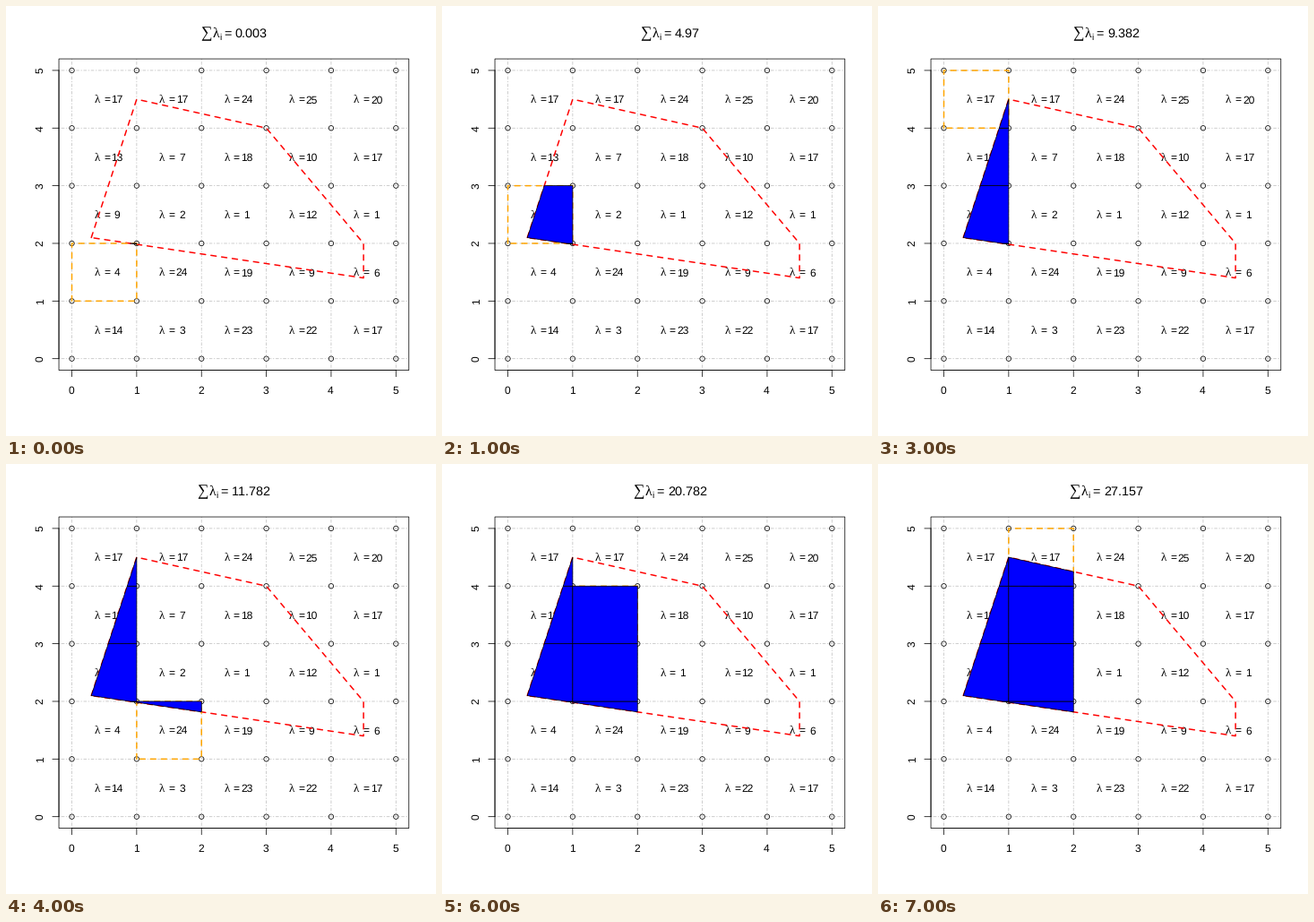
A matplotlib script that plays this animation: 480 by 480 pixels, repeating every 8000 ms.

```python
import matplotlib.pyplot as plt
from matplotlib.animation import FuncAnimation
from matplotlib.patches import Circle, Polygon, Rectangle

SIZE, DPI = 480, 72
SANS, SERIF = "Liberation Sans", "Liberation Serif"
LEFT, RIGHT, TOP, BOTTOM = 59.04, 449.76, 59.04, 406.56
THIN, THICK = 0.75, 1.5
DASH = (0, (4, 4))
DOT_DASH = (0, (1, 3, 4, 3))

# Cell rates, one row per y interval from the bottom up
RATES = [
    [14, 3, 23, 22, 17],
    [4, 24, 19, 9, 6],
    [9, 2, 1, 12, 1],
    [13, 7, 18, 10, 17],
    [17, 17, 24, 25, 20],
]
REGION = [(0.3, 2.1), (1, 4.5), (3, 4), (4.5, 2), (4.5, 1.4)]
CELLS = [(i, j) for i in (0, 1) for j in (1, 2, 3, 4)]

# Unsnapped lines keep sub-pixel positions; a factor of 6 turns kerning off
plt.rcParams.update({"text.hinting": "none", "text.kerning_factor": 6,
                     "path.snap": False})
fig = plt.figure(figsize=(SIZE / DPI, SIZE / DPI), dpi=DPI, facecolor="white")
ax = fig.add_axes([0, 0, 1, 1])
ax.set_xlim(0, SIZE)
ax.set_ylim(SIZE, 0)
ax.axis("off")


def px(x):
    return LEFT + (x + 0.2) * (RIGHT - LEFT) / 5.4


def py(y):
    return BOTTOM - (y + 0.2) * (BOTTOM - TOP) / 5.4


def to_px(points):
    return [(px(x), py(y)) for x, y in points]


def line(xs, ys, color="black", style="-", z=2):
    ax.plot(xs, ys, color=color, lw=THIN, ls=style, zorder=z,
            dash_capstyle="round", solid_capstyle="round")


def label(x, y, s, size=12, font=SANS, ha="left", **kw):
    return ax.text(x, y, s, fontsize=size, family=font, ha=ha,
                   va="baseline", zorder=3, **kw)


def outline(points, color, z):
    return ax.add_patch(Polygon(to_px(points), fill=False, ec=color, lw=THICK,
                                ls=DASH, capstyle="round", joinstyle="round",
                                zorder=z))


def square(i, j):
    return [(i, j), (i, j + 1), (i + 1, j + 1), (i + 1, j)]


def clip_half(points, axis, limit, sign):
    """Keep the part of a polygon where sign * (coordinate - limit) >= 0."""
    out = []
    for a, b in zip(points, points[1:] + points[:1]):
        da, db = sign * (a[axis] - limit), sign * (b[axis] - limit)
        if da >= 0:
            out.append(a)
        if da * db < 0:
            t = da / (da - db)
            out.append((a[0] + t * (b[0] - a[0]), a[1] + t * (b[1] - a[1])))
    return out


def clip_to_cell(points, i, j):
    for axis, low in ((0, i), (1, j)):
        points = clip_half(points, axis, low, 1)
        points = clip_half(points, axis, low + 1, -1)
    return points


def area(points):
    pairs = zip(points, points[1:] + points[:1])
    return abs(sum(a[0] * b[1] - b[0] * a[1] for a, b in pairs)) / 2


# Frame, axes, grid and lattice points
ax.add_patch(Rectangle((LEFT, TOP), RIGHT - LEFT, BOTTOM - TOP, fill=False,
                       ec="black", lw=THIN, zorder=2))
line([px(0), px(5)], [BOTTOM, BOTTOM])
line([LEFT, LEFT], [py(0), py(5)])
for k in range(6):
    x, y = px(k), py(k)
    line([x, x], [BOTTOM, TOP], "#bebebe", DOT_DASH, z=1)
    line([LEFT, RIGHT], [y, y], "#bebebe", DOT_DASH, z=1)
    line([x, x], [BOTTOM, BOTTOM + 7.2])
    line([LEFT - 7.2, LEFT], [y, y])
    label(x - 0.6, 432.6, str(k), ha="center")
    label(41.8, y, str(k), ha="center", rotation=90, rotation_mode="anchor")
    for m in range(6):
        ax.add_patch(Circle((x, py(m)), 2.7, fill=False, ec="black",
                            lw=THIN, zorder=3))

for j, row in enumerate(RATES):
    for i, rate in enumerate(row):
        mid, base = px(i + 0.5), py(j + 0.5) + 4.3
        label(mid - 11, base, "λ", 13, SERIF)
        label(mid - 0.7, base, "=")
        label(px(i + 0.7), base, str(rate), ha="center")

outline(REGION, "red", 4)
cursor = outline(square(*CELLS[0]), "orange", 5)

# Filled pieces and the running total after each of them
pieces, totals, total = [], [], 0
for i, j in CELLS:
    part = clip_to_cell(REGION, i, j)
    total += RATES[j][i] * area(part)
    totals.append(f"{round(total, 3):g}")
    pieces.append(ax.add_patch(Polygon(to_px(part), fc="blue", ec="black",
                                       lw=THIN, joinstyle="round", zorder=6)))

# Title parts with their offsets from the title's left edge
title = [
    (label(0, 35, "∑", 17.5, SERIF), 0),
    (label(0, 35, "λ", 15.6, SERIF), 14.2),
    (label(0, 38, "i", 10), 21.8),
    (label(0, 35, "=", 14.4), 26.4),
    (label(0, 35, "", 14.4), 39),
]


def update(n):
    cursor.set_xy(to_px(square(*CELLS[n])))
    for k, piece in enumerate(pieces):
        piece.set_visible(k <= n)
    value = totals[n]
    width = 39 + 14.4 * (0.556 * (len(value) - 1) + 0.278)
    for part, offset in title:
        part.set_x((LEFT + RIGHT - width) / 2 + offset)
    title[-1][0].set_text(value)
    return [cursor, *pieces, *(part for part, _ in title)]


anim = FuncAnimation(fig, update, frames=len(CELLS), interval=1000,
                     repeat=True, repeat_delay=0)
plt.show()
```
